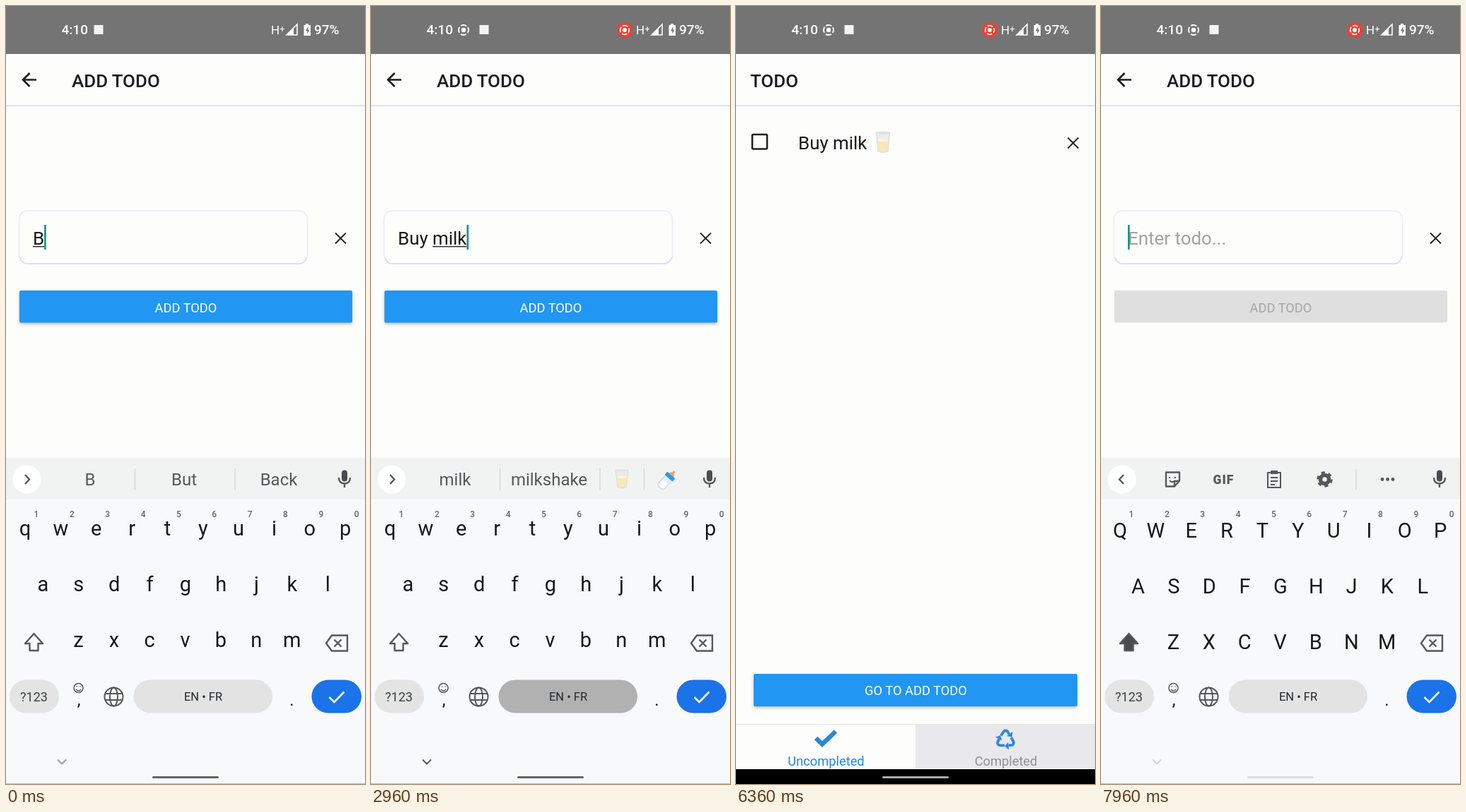
Animation, 508 px wide and 1102 px high, one loop 8000 ms. Source, as an HTML page:

```html
<!DOCTYPE html>
<html lang="en">
<head>
<meta charset="utf-8">
<title>Todo app</title>
<style>
html, body { margin: 0; height: 100%; overflow: hidden; background: #fdfdfc; }
svg { display: block; width: 100vw; height: 100vh; }
text { font-family: Roboto, sans-serif; white-space: pre; }
.m { text-anchor: middle; }
.title { font-size: 25.9px; font-weight: 500; fill: #1c1b1f; }
.body { font-size: 25.9px; fill: #1a1a1a; }
.btn { font-size: 18.3px; fill: #fff; text-anchor: middle; }
.key { font-size: 29px; fill: #16181b; text-anchor: middle; }
.mark { font-size: 24px; }
.hint { font-size: 12px; font-weight: 500; fill: #63666a; text-anchor: middle; }
.sug { font-size: 24px; fill: #54585c; text-anchor: middle; }
.line { fill: none; stroke: #54585c; stroke-width: 2.4; }
.thin { stroke-width: 2; }
.status { font-size: 19px; font-weight: 500; fill: #fff; }
.net { font-size: 17px; font-weight: 400; }
.shadow { filter: drop-shadow(0 2px 2px #0004); }
</style>
</head>
<body>
<svg viewBox="0 0 508 1102" preserveAspectRatio="none">
  <defs>
    <clipPath id="window"><rect id="windowRect" y="68" width="508" height="573"/></clipPath>
    <radialGradient id="ripple">
      <stop offset="0" stop-color="#003a70" stop-opacity=".3"/>
      <stop offset=".6" stop-color="#003a70" stop-opacity=".22"/>
      <stop offset="1" stop-color="#003a70" stop-opacity="0"/>
    </radialGradient>
    <clipPath id="addClip"><rect x="19" y="403" width="471" height="45.500" rx="2"/></clipPath>
    <clipPath id="goClip"><rect x="25" y="946" width="458" height="46" rx="2"/></clipPath>
    <path id="cross" d="M-7.5-7.5 7.5 7.5M7.5-7.5-7.5 7.5" fill="none" stroke="#222" stroke-width="1.9"/>
    <g id="milk">
      <path d="M-9.5-14h19l-2.5 27q-7 3-14 0z" fill="#e9ecec" stroke="#d3d8d8"/>
      <path d="M-8.2-3h16.4l-1.6 15q-6.6 2.5-13.2 0z" fill="#f7e7b9"/>
      <ellipse cy="-3" rx="8.2" ry="2" fill="#fff5da"/>
      <ellipse cy="-13.5" rx="9.5" ry="2" fill="#dfe4e4"/>
    </g>
    <g id="bottle" transform="rotate(42)">
      <rect x="-6" y="-4" width="12" height="19" rx="4" fill="#e6edf0" stroke="#c6d0d5"/>
      <rect x="-5" y="3" width="10" height="11" rx="3" fill="#fbfbfb"/>
      <rect x="-7.5" y="-9" width="15" height="6" rx="1.5" fill="#2f9be8"/>
      <path d="M-4-9q0-3 2.5-4v-3h3v3q2.5 1 2.5 4z" fill="#f2a45a"/>
    </g>
    <g id="recycleArm">
      <path d="M-6.5-5.5-3-11Q0-14.500 3-11L5-7.500" fill="none" stroke="#2a87dd" stroke-width="3.8"/>
      <path d="M1.500-5 9-3.500 10-11z" fill="#2a87dd"/>
    </g>
    <g id="target" fill="none" stroke="#fff">
      <circle r="3.2" fill="#fff" stroke="none"/>
      <circle r="7" stroke-width="1.9" stroke-dasharray="8.5 2.5" stroke-dashoffset="4.2"/>
    </g>
  </defs>

  <rect width="508" height="1102" fill="#fdfdfc"/>
  <rect y="1081" width="508" height="21"/>

  <g clip-path="url(#window)">
    <g id="listPage">
      <text class="title" x="20" y="115">TODO</text>
      <rect y="140.5" width="508" height="1.5" fill="#d9d5f4"/>
      <rect x="23" y="182" width="21" height="20.5" rx="1.5" fill="none" stroke="#222" stroke-width="2.6"/>
      <text class="body" x="88" y="202.5">Buy milk</text>
      <use href="#milk" x="208" y="193"/>
      <use href="#cross" x="477" y="194"/>
      <g id="listFoot">
        <rect class="shadow" x="25" y="946" width="458" height="46" rx="2" fill="#2196f3"/>
        <g clip-path="url(#goClip)"><circle id="goRipple" cx="270" cy="969" fill="url(#ripple)"/></g>
        <text class="btn" x="254.5" y="976">GO TO ADD TODO</text>
        <rect x="254" y="1018" width="254" height="63" fill="#e9e9eb"/>
        <rect y="1017" width="508" height="1" fill="#e4e4e4"/>
        <path d="M113 1037 122 1045.5 141 1027.5" fill="none" stroke="#2a87dd" stroke-width="6.5"/>
        <g transform="translate(381.5 1039)">
          <use href="#recycleArm"/>
          <use href="#recycleArm" transform="rotate(120)"/>
          <use href="#recycleArm" transform="rotate(240)"/>
        </g>
        <text class="m" x="127.5" y="1076" font-size="18.3" fill="#1e88e5">Uncompleted</text>
        <text class="m" x="382" y="1076" font-size="18.3" fill="#919194">Completed</text>
      </g>
    </g>

    <g id="addPage">
      <path d="M43 104.5H24M33.5 95 24 104.5 33.5 114" fill="none" stroke="#1c1b1f" stroke-width="2.6"/>
      <text class="title" x="93" y="115">ADD TODO</text>
      <rect y="140.5" width="508" height="1.5" fill="#d9d5f4"/>
      <rect x="18.5" y="290" width="408" height="75" rx="12" fill="#fdfdfc" stroke="#ebeaf8" stroke-width="1.5"/>
      <path d="M20 356Q22 365 31 365H414Q423 365 425.5 356" fill="none" stroke="#dcdaf3" stroke-width="1.5"/>
      <text id="hintText" class="body" x="38" y="337.5" fill-opacity=".4">Enter todo...</text>
      <text id="typed" class="body" x="38" y="337.5"></text>
      <rect id="underline" y="340" height="1.5" fill="#333"/>
      <use id="fieldMilk" href="#milk" y="328"/>
      <rect id="caret" y="310" width="2.6" height="35" fill="#0b9488"/>
      <use href="#cross" x="473.5" y="329"/>
      <g id="addOn">
        <rect class="shadow" x="19" y="403" width="471" height="45.5" rx="2" fill="#2196f3"/>
        <g clip-path="url(#addClip)"><circle id="addRipple" cx="254" cy="426" fill="url(#ripple)"/></g>
      </g>
      <rect id="addOff" x="19" y="403" width="471" height="45.5" rx="2" fill="#dfdfdf"/>
      <text id="addLabel" class="btn" x="254.5" y="433.5">ADD TODO</text>
    </g>
  </g>

  <rect width="508" height="68" fill="#747474"/>
  <text class="status" x="78.5" y="40">4:10</text>
  <use id="recIcon" href="#target" x="131" y="34"/>
  <rect id="appIcon" y="27" width="13" height="13" fill="#f3f3f3"/>
  <g id="chip">
    <rect x="-11" y="-10.5" width="22" height="21" rx="9" fill="#e94235"/>
    <use href="#target" transform="scale(.9)"/>
  </g>
  <text class="status net" x="375" y="40">H<tspan dy="-3" font-size="13">+</tspan></text>
  <path d="M397 41 412 26V41z" fill="none" stroke="#fff" stroke-width="1.6"/>
  <path d="M397 41 407 31V41z" fill="#fff"/>
  <path d="M424 25h4v2h3v15h-9.5V27h2.5z" fill="#fff"/>
  <path d="M427.5 29 424 35.5h2.3v4L429.5 33.5h-2.2z" fill="#747474"/>
  <text class="status" x="436" y="40">97%</text>

  <g id="keyboard">
    <rect y="640" width="508" height="500" fill="#f8f9fa"/>
    <rect y="640" width="508" height="59" fill="#f1f3f2"/>
    <circle cx="29.5" cy="670.5" r="20" fill="#fff"/>
    <path id="chevron" class="line"/>
    <g transform="translate(479 670)">
      <rect x="-4" y="-12.5" width="8" height="16" rx="4" fill="#484b50"/>
      <path class="line" d="M-8-2Q-8 6.5 0 6.5T8-2M0 6.5V12"/>
    </g>
    <g id="suggestions">
      <text class="sug" x="119" y="679"></text>
      <text class="sug" x="252" y="679"></text>
      <text class="sug" x="386" y="679"></text>
      <path d="M182.5 655v31M324 655v31" stroke="#d6d8d8" stroke-width="1.5"/>
      <g id="emojiPair">
        <use href="#milk" transform="translate(355 670) scale(.9)"/>
        <path d="M386.5 655v31" stroke="#d6d8d8" stroke-width="1.5"/>
        <use href="#bottle" x="419" y="671"/>
      </g>
    </g>
    <g id="toolbar">
      <path class="line" d="M92 660.500h19v12l-7 8H92zM111 673h-7v7" stroke-linejoin="round"/>
      <path class="line thin" d="M97 667v2M105 667v2M97 672q3 4 6 1"/>
      <text class="m" x="173.5" y="677" font-size="17.5" font-weight="900" letter-spacing="1" fill="#54585c">GIF</text>
      <path class="line thin" d="M236 661h18v21h-18zM240 668h10M240 673h10M240 678h6"/>
      <rect x="240" y="658" width="10" height="5" fill="#54585c"/>
      <circle cx="316.5" cy="670.5" r="6" fill="none" stroke="#54585c" stroke-width="5.5"/>
      <circle cx="316.5" cy="670.5" r="9.5" fill="none" stroke="#54585c" stroke-width="3.5" stroke-dasharray="5 4.95"/>
      <path d="M361 656v29" stroke="#d6d8d8" stroke-width="1.5"/>
      <path d="M398 670.5h.1M405.5 670.5h.1M413 670.5h.1" stroke="#54585c" stroke-width="4.8" stroke-linecap="round"/>
    </g>
    <g id="lower"></g>
    <g id="upper"></g>
    <g id="hints"></g>
    <path id="shift" class="line" d="M39.5 889 27 903H33.5V913H45.5V903H52z" stroke-linejoin="round"/>
    <path class="line" d="M461 891.5H483V913.5H461L453 902.5zM464.5 897.5 474.5 907.5M474.5 897.5 464.5 907.5"/>
    <rect x="5" y="954.5" width="70" height="47" rx="23.5" fill="#e3e4e3"/>
    <text class="m" x="39.5" y="984.5" font-size="18" fill="#3c4043">?123</text>
    <g fill="none" stroke="#54585c" stroke-width="1.5">
      <circle cx="102.5" cy="966" r="6.5"/>
      <path d="M99 968q3.5 4 7 0M100 964h1M104.500 964h1"/>
    </g>
    <text class="key mark" x="103" y="991">,</text>
    <g class="line thin">
      <circle cx="152.5" cy="978.5" r="13"/>
      <ellipse cx="152.5" cy="978.5" rx="5.5" ry="13"/>
      <path d="M140.5 974h24M140.5 983h24"/>
    </g>
    <rect id="space" x="180.5" y="954.5" width="196.5" height="47" rx="23.5"/>
    <text class="m" x="279" y="984" font-size="16.5" fill="#24272a">EN • FR</text>
    <text class="key mark" x="404.5" y="991">.</text>
    <rect x="432.5" y="954.5" width="70.5" height="47" rx="23.5" fill="#1a73e8"/>
    <path d="M457.5 979 464.5 986 478.5 971.5" fill="none" stroke="#fff" stroke-width="2.6"/>
    <path id="hideArrow" class="line thin" d="M73 1067.5 79 1073.5 85 1067.5"/>
    <rect y="1101" width="508" height="1" fill="#bbb"/>
  </g>
  <rect id="handle" x="207" y="1091" width="94" height="3" rx="1.5"/>
</svg>
<script>
const LOOP = 8000;
const $ = id => document.getElementById(id);
const set = (id, attrs) => { for (const k in attrs) $(id).setAttribute(k, attrs[k]); };
const show = (id, on) => set(id, { visibility: on ? 'visible' : 'hidden' });
const clamp = x => Math.max(0, Math.min(1, x));
const ramp = (t, a, b) => clamp((t - a) / (b - a));
const easeOut = x => 1 - (1 - x) ** 4;

// start time, committed text, text being composed, suggestions
const states = [
  [0, '', 'B', 'B But Back'],
  [400, '', 'Bu', 'Bu But Buy'],
  [840, '', 'Buy', 'Buy Buying But'],
  [1480, 'Buy ', '', 'a the it'],
  [1840, 'Buy ', 'm', 'm my me'],
  [2040, 'Buy ', 'mi', 'mi milk mine'],
  [2200, 'Buy ', 'mil', 'mil milk mile'],
  [2900, 'Buy ', 'milk', 'milk milkshake'],
  [3460, 'Buy milk ', '', 'and for the'],
  [5520, '', '', ''],
  [7700, '', '', '']
];
const SENT = 5520, CLOSE = 5580, OPEN = 7560, FOCUS = 7700;

function addKeys() {
  const text = (cls, x, y, s) => `<text class="${cls}" x="${x}" y="${y}">${s}</text>`;
  const rows = [['qwertyuiop', 27], ['asdfghjkl', 52.5], ['zxcvbnm', 102.5]];
  rows.forEach(([keys, left], row) => [...keys].forEach((key, i) => {
    const x = left + i * 50.35, y = 750 + row * 79;
    $('lower').innerHTML += text('key', x, y, key);
    $('upper').innerHTML += text('key', x, y + 3, key.toUpperCase());
    if (!row) $('hints').innerHTML += text('hint', x + 16, 724, (i + 1) % 10);
  }));
}

function drawField(t, [start, done, composing]) {
  const field = $('typed'), empty = !done && !composing;
  const width = s => { field.textContent = s; return s ? field.getComputedTextLength() : 0; };
  const from = 38 + width(done);
  let end = 38 + width(done + composing);
  const hasMilk = done.length > 4;
  if (hasMilk) { set('fieldMilk', { x: end + 16 }); end += 32; }
  show('fieldMilk', hasMilk);
  show('hintText', empty);
  set('underline', { x: from, width: composing ? end - from : 0 });
  set('caret', { x: end });
  show('caret', (t < SENT || t >= FOCUS) && (t - start) % 1000 < 500);
  show('addOn', !empty);
  show('addOff', empty);
  $('addLabel').style.fill = empty ? '#a5a5a5' : '#fff';
}

function drawKeyboard(t, [, , composing, words]) {
  const upper = t >= FOCUS, list = words.split(' ');
  show('upper', upper);
  show('toolbar', upper);
  show('lower', !upper);
  show('suggestions', words);
  show('emojiPair', list.length === 2);
  document.querySelectorAll('.sug').forEach((el, i) => el.textContent = list[i] || '');
  set('chevron', { d: upper ? 'M32 664 26 670.5 32 677' : 'M27 664 33 670.5 27 677' });
  $('shift').style.fill = upper ? '#484b50' : 'none';
  set('space', { fill: composing.length > 1 ? '#b1b1b1' : '#e2e3e2' });

  const hide = ramp(t, CLOSE, 5780), rise = easeOut(ramp(t, FOCUS, 7940));
  const shift = 422 * (t < FOCUS ? hide ** 2 : 1 - rise);
  set('keyboard', {
    transform: `translate(0 ${shift})`,
    opacity: t < FOCUS ? 1 - hide : clamp(rise * 1.5)
  });
  set('hideArrow', {
    opacity: t < 5400 ? .55 + .45 * ramp(t, 0, 400) : t < FOCUS ? 1 - ramp(t, 5480, 5580) : ramp(t, 7920, 8120)
  });

  let shade = 100 - 45 * ramp(t, 5560, 5640) + 115 * ramp(t, 5640, 6200) + 80 * ramp(t, 6360, 7120);
  shade -= 30 * ramp(t, 7700, 7960);
  set('handle', { fill: `rgb(${shade},${shade},${shade})` });
}

function drawPages(t) {
  const bottom = t < 5720 || t >= 7900 ? 641 : 1080;
  const mid = (68 + bottom) / 2;
  const opening = t >= OPEN;
  const p = opening ? easeOut(ramp(t, OPEN, 7960)) : 1 - easeOut(ramp(t, CLOSE, 5960));
  const place = (id, s, opacity) => set(id, {
    transform: `translate(254 ${mid}) scale(${s}) translate(-254 ${-mid})`, opacity
  });
  place('addPage', 1 - (opening ? .15 : .075) * (1 - p), clamp((p - .33) / .6));
  place('listPage', 1 + .15 * p, clamp((.67 - p) / .57));
  set('windowRect', { height: bottom - 68 });
  set('listFoot', { transform: `translate(0 ${bottom - 1080})` });
  const press = (id, a, b) => set(id, { r: 330 * ramp(t, a, b), opacity: 1 - ramp(t, b, b + 120) });
  press('goRipple', 7410, 7620);
  press('addRipple', 5440, 5540);
}

function drawStatus(t) {
  const recording = t >= 40;
  show('chip', recording);
  show('recIcon', recording);
  set('appIcon', { x: recording ? 153.5 : 124.5 });
  set('chip', { transform: `translate(359 34) scale(${easeOut(ramp(t, 0, 320))})` });
}

function frame(now) {
  const t = now % LOOP;
  const state = states.findLast(s => s[0] <= t);
  drawPages(t);
  drawField(t, state);
  drawKeyboard(t, state);
  drawStatus(t);
}

addKeys();
const begin = performance.now();
function tick() {
  frame(performance.now() - begin);
  requestAnimationFrame(tick);
}
tick();
</script>
</body>
</html>
```
